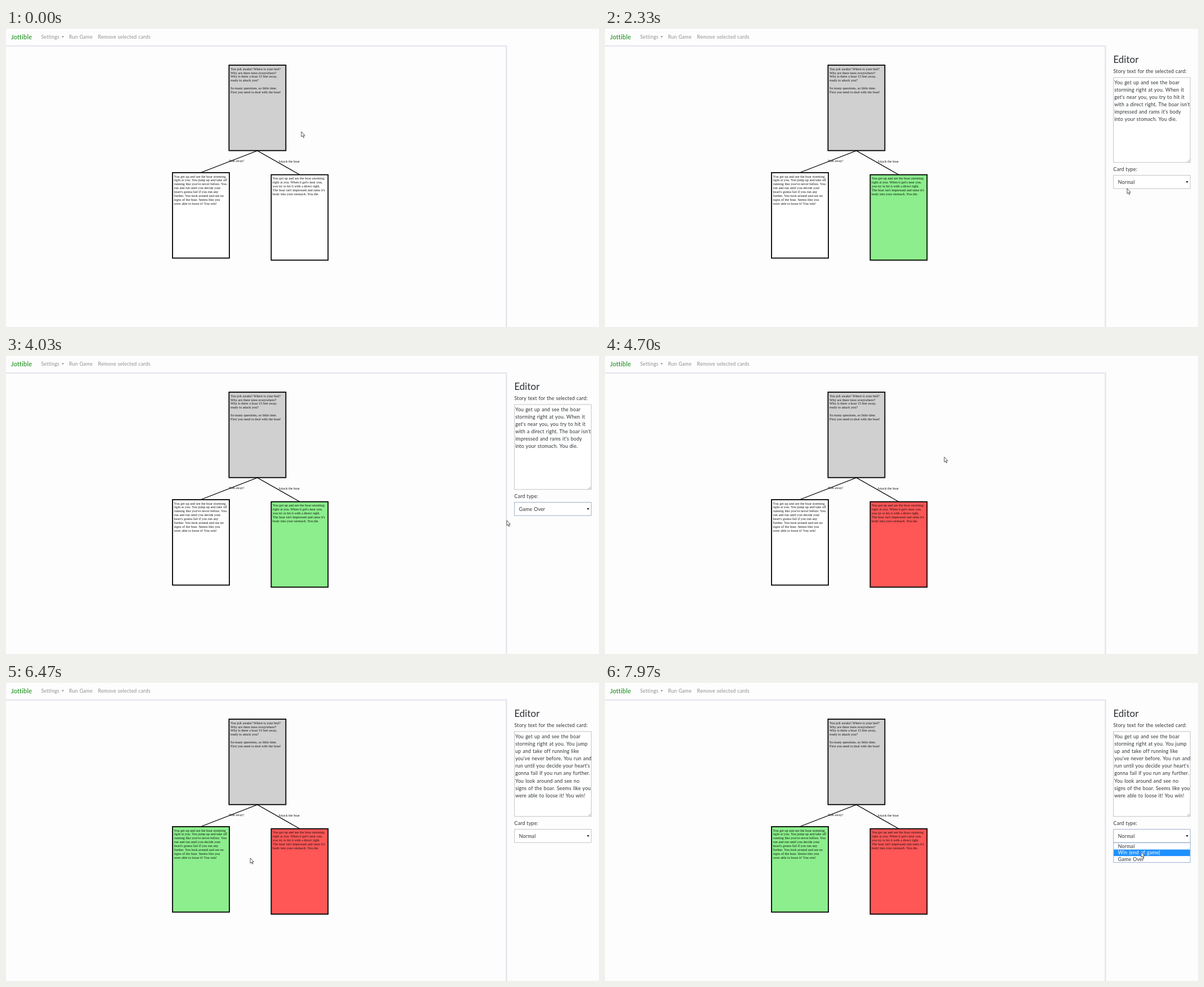
An HTML page for the animation above (8000 ms loop, 1054 by 531 pixels).

```html
<!DOCTYPE html>
<html lang="en">
<head>
<meta charset="utf-8">
<title>Story card editor</title>
<style>
  html, body { margin: 0; width: 100%; height: 100%; overflow: hidden; background: #fdfdfd; }
  svg { display: block; width: 1054px; height: 531px; }
  .ui { font: 8.8px Lato, "Open Sans", sans-serif; letter-spacing: .022em; word-spacing: .06em; fill: #2c3034; }
  .nav { fill: #8f8f8f; }
  .brand { font-size: 11px; fill: #0a870a; }
  .heading { font-size: 17px; letter-spacing: 0; }
  .story { font: 6.2px "Liberation Serif", "Times New Roman", serif; fill: #111; }
  .card { stroke: #000; stroke-width: 1.8; }
  .field { fill: #fff; stroke: #b4b4b8; stroke-width: .8; }
  .edge { stroke: #000; stroke-width: 1.2; }
</style>
</head>
<body>
<svg id="stage" viewBox="0 0 1054 531">
  <rect width="1054" height="531" fill="#fdfdfd"/>
  <path d="M0 .5H1054" stroke="#e9e9e2"/>
  <path d="M0 32H889.5V531" fill="none" stroke="#f1f1f7" stroke-width="3"/>
  <path d="M0 31.8H889.3V531" fill="none" stroke="#dcdce8"/>
  <g class="ui nav">
    <text class="brand" x="9" y="20">Jottible</text>
    <text x="62.4" y="19.2">Settings</text>
    <path d="M98.5 14.4h4.8l-2.4 2.5z"/>
    <text x="112" y="19.2">Run Game</text>
    <text x="163.6" y="19.2">Remove selected cards</text>
  </g>
  <g id="cards"></g>
  <path class="edge" d="M347 256.5L446.8 218L521.5 260.3" fill="none"/>
  <g class="story">
    <text x="396.5" y="237.8">Run away!</text>
    <text x="484" y="239.4">Attack the boar</text>
  </g>
  <g id="editor" class="ui">
    <text class="heading" x="903.4" y="62">Editor</text>
    <text x="903.6" y="80">Story text for the selected card:</text>
    <rect class="field" x="903.8" y="88" width="136.4" height="150.8"/>
    <path d="M1035 238l4.4-4.4M1037.3 238l2.1-2.1" stroke="#777" stroke-width=".6"/>
    <g id="notes"></g>
    <text x="903.6" y="253.6">Card type:</text>
    <rect id="select" class="field" x="903.8" y="261.7" width="136.4" height="23.4"/>
    <text id="kind" x="911.8" y="276.6"></text>
    <path d="M1032.6 271.9h4l-2 3.4z" fill="#111"/>
    <g id="menu"></g>
  </g>
  <path id="cursor" d="M0 0V9.2L2.1 7.3L3.6 10.6L5 10L3.6 6.8H6.2Z" fill="#fff" stroke="#222" stroke-width=".75"/>
</svg>
<script>
const LOOP = 8000;
const $ = id => document.getElementById(id);

function add(parent, tag, attrs, text) {
  const el = document.createElementNS("http://www.w3.org/2000/svg", tag);
  for (const k in attrs) el.setAttribute(k, attrs[k]);
  if (text) el.textContent = text;
  return parent.appendChild(el);
}

function addLines(parent, lines, x, y, pitch) {
  lines.forEach((line, i) => add(parent, "text", { x, y: y + i * pitch }, line));
}

function addCard(x, y, lines) {
  const g = add($("cards"), "g", { class: "story" });
  const box = add(g, "rect", { class: "card", x, y, width: 101, height: 151.7, fill: "#fff" });
  addLines(g, lines, x + 2.6, y + 8.7, 6.85);
  return box;
}

const start = addCard(396.4, 66, [
  "You jolt awake! Where is your bed?", "Why are there trees everywhere?",
  "Why is there a boar 15 feet away,", "ready to attack you?", "",
  "So many questions, so little time.", "First you need to deal with the boar!"]);
start.setAttribute("fill", "#d0d0d1");

const runCard = addCard(296, 256.9, [
  "You get up and see the boar storming", "right at you. You jump up and take off",
  "running like you've never before. You", "run and run until you decide your",
  "heart's gonna fail if you run any", "further. You look around and see no",
  "signs of the boar. Seems like you", "were able to loose it! You win!"]);

const fightCard = addCard(471.4, 260.6, [
  "You get up and see the boar storming", "right at you. When it get's near you,",
  "you try to hit it with a direct right.", "The boar isn't impressed and rams it's",
  "body into your stomach. You die."]);

function addNotes(lines) {
  const g = add($("notes"), "g", {});
  addLines(g, lines, 905.2, 99.6, 13.15);
  return g;
}

const fightNotes = addNotes([
  "You get up and see the boar", "storming right at you. When it",
  "get's near you, you try to hit it", "with a direct right. The boar isn't",
  "impressed and rams it's body", "into your stomach. You die."]);

const runNotes = addNotes([
  "You get up and see the boar", "storming right at you. You jump",
  "up and take off running like", "you've never before. You run and",
  "run until you decide your heart's", "gonna fail if you run any further.",
  "You look around and see no", "signs of the boar. Seems like you",
  "were able to loose it! You win!"]);

const menu = $("menu");
add(menu, "rect", { x: 903.8, y: 285.6, width: 136.4, height: 34.9, fill: "#fff", stroke: "#7d9fd0", "stroke-width": .8 });
const mark = add(menu, "rect", { x: 904.2, width: 135.6, height: 11.6, fill: "#1e90ff" });
const options = ["Normal", "Win (end of game)", "Game Over"].map((name, i) =>
  add(menu, "text", { x: 911.8, y: 294.6 + i * 11.6 }, name));

// Pointer stops: time, x, y
const path = [
  [0, 525, 184], [250, 525, 184], [950, 518, 309], [1640, 518, 309],
  [2330, 928, 285], [2540, 932, 277], [2780, 932, 277], [3230, 941, 304],
  [3560, 944, 315], [3880, 944, 315], [4480, 603, 181], [5080, 603, 181],
  [5780, 350, 319], [6280, 350, 319], [7080, 935, 275], [7400, 935, 275],
  [7850, 953, 302], [LOOP, 953, 302]];

function pointer(t) {
  const i = path.findIndex(p => p[0] > t);
  const [t0, x0, y0] = path[i - 1], [t1, x1, y1] = path[i];
  const u = (t - t0) / (t1 - t0), s = u * u * (3 - 2 * u);
  return [x0 + (x1 - x0) * s, y0 + (y1 - y0) * s];
}

const within = (t, a, b) => t >= a && t < b;
const show = (el, on) => el.style.display = on ? "" : "none";

function draw(t) {
  const [x, y] = pointer(t);
  $("cursor").setAttribute("transform", `translate(${x} ${y})`);

  const fight = within(t, 1500, 4560), run = t >= 6050;
  const open = within(t, 2640, 3760) || t >= 7300;
  const focus = within(t, 2640, 4560) || t >= 7300;
  fightCard.setAttribute("fill", fight ? "#8cee8c" : t >= 4560 ? "#ff5656" : "#fff");
  runCard.setAttribute("fill", run ? "#8cee8c" : "#fff");

  show($("editor"), fight || run);
  show(fightNotes, fight);
  show(runNotes, run);
  show(menu, open);
  $("select").style.stroke = focus ? "#8499b8" : "";
  $("kind").textContent = within(t, 3760, 4560) ? "Game Over" : "Normal";

  const row = y < 297.2 ? 0 : y < 308.8 ? 1 : 2;
  mark.setAttribute("y", 285.9 + row * 11.6);
  options.forEach((el, i) => el.style.fill = i === row ? "#fff" : "");
}

const begin = performance.now();
function tick() {
  draw((performance.now() - begin) % LOOP);
  requestAnimationFrame(tick);
}
tick();
</script>
</body>
</html>
```
